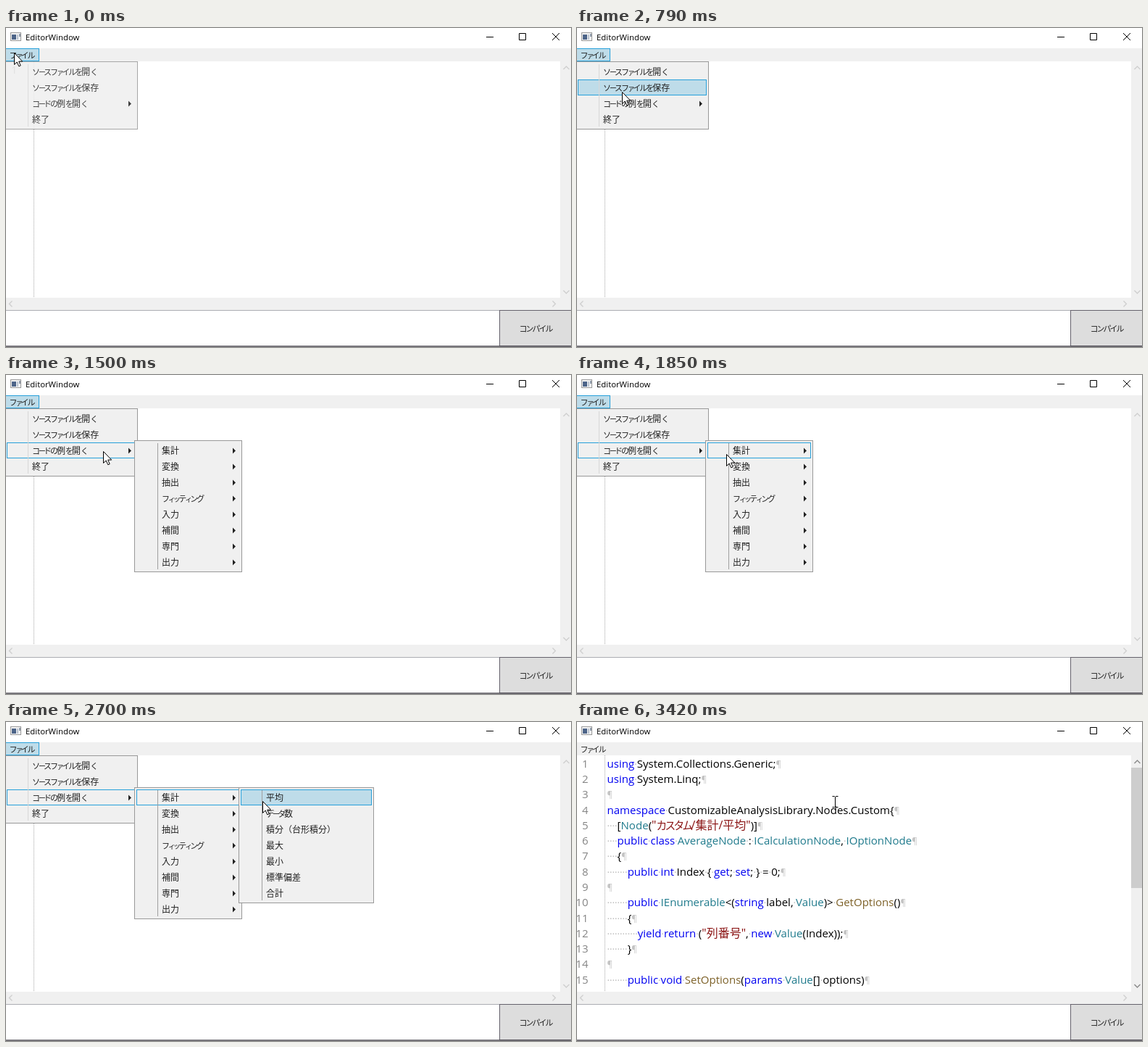
These frames come from a looping animation (780x440 px, 4.61 s). An HTML page:

```html
<!DOCTYPE html>
<html lang="ja">
<head>
<meta charset="utf-8">
<title>EditorWindow</title>
<style>
html, body { margin: 0; width: 100%; height: 100%; overflow: hidden; background: #fff; }
svg { display: block; }
text { font: 12px "Noto Sans CJK JP", "Noto Sans CJK", sans-serif; fill: #212121; }
.title { font: 11.35px "Open Sans", sans-serif; fill: #000; }
.code text { font: 15.05px "Open Sans", "Noto Sans CJK JP", "Noto Sans CJK", sans-serif; fill: #000; }
.code .num { fill: #858585; text-anchor: end; }
/* narrow kana, and narrower small kana */
.k { font-size: .92em; letter-spacing: -.185em; }
.s { font-size: .82em; letter-spacing: -.28em; }
.dot { font-size: 13.2px; fill: #b4b4b4; }
.eol { font-size: 12px; fill: #c4c4c4; }
.key { fill: #0000f0; }
.type { fill: #1f7a8c; }
.str { fill: #8b1515; font-size: 16px; }
.call { fill: #7d6128; }
.line { fill: none; stroke: #000; }
.chev { fill: none; stroke: #cfcfcf; stroke-width: 1.4; }
.panel { fill: #f0f0f0; stroke: #999; }
.hot { fill: #bedce9; stroke: #26a0da; }
.head { fill: none; stroke: #26a0da; }
</style>
</head>
<body>
<svg id="stage" width="780" height="440" viewBox="0 0 780 440"></svg>
<script>
const LOOP = 4610, TICK = 71.2;
const stage = document.getElementById('stage');

const span = (cls, s) => `<tspan class="${cls}">${s}</tspan>`;
const rect = (x, y, w, h, attrs) => `<rect x="${x}" y="${y}" width="${w}" height="${h}" ${attrs}/>`;
const path = (d, attrs) => `<path d="${d}" ${attrs}/>`;

const plain = s => s.replace(/[< ぁ-ヶー]/g, c =>
  c === '<' ? '&lt;' :
  c === ' ' ? span('dot', '·') :
  span('ァィッー'.includes(c) ? 's' : 'k', c));
const label = (x, y, s) => `<text x="${x}" y="${y}">${plain(s)}</text>`;

// Code view
const source = `using System.Collections.Generic;
using System.Linq;

namespace CustomizableAnalysisLibrary.Nodes.Custom{
    [Node("カスタム/集計/平均")]
    public class AverageNode : ICalculationNode, IOptionNode
    {
        public int Index { get; set; } = 0;

        public IEnumerable<(string label, Value)> GetOptions()
        {
            yield return ("列番号", new Value(Index));
        }

        public void SetOptions(params Value[] options)
        {`.split('\n');

const rules = [
  ['str', /^"[^"]*"$/],
  ['key', /^(using|namespace|public|class|int|get|set|string|yield|return|new|void|params)$/],
  ['type', /^(Node|AverageNode|ICalculationNode|IOptionNode|IEnumerable|Value)$/],
  ['call', /^[GS]etOptions$/]
];
const paint = line => line.split(/("[^"]*"|\w+)/).map(word => {
  const rule = rules.find(r => r[1].test(word));
  return rule ? span(rule[0], plain(word)) : plain(word);
}).join('') + span('eol', '¶');

const lineY = i => 62.7 + 21.28 * i;
const lineNo = i => `<text class="num" x="15.5" y="${lineY(i)}">${i + 1}</text>`;
const codeView = source.map((s, i) =>
  (i ? lineNo(i) : '') + `<text x="41.5" y="${lineY(i)}">${paint(s)}</text>`).join('');

// Menus
const menus = [
  { x: -1, y: 46, w: 182, bar: 30, open: -1.6, hotX: 1.5, hotW: 177, tone: '#d7d7d7',
    items: ['ソースファイルを開く', 'ソースファイルを保存', 'コードの例を開く>', '終了'] },
  { x: 177, y: 90, w: 148, bar: 209, open: 18, hotX: 180.5, hotW: 142, tone: '#a0a0a0',
    items: ['集計>', '変換>', '抽出>', 'フィッティング>', '入力>', '補間>', '専門>', '出力>'] },
  { x: 321, y: 90, w: 186, bar: 353, open: 31, hotX: 324.5, hotW: 180, tone: '#a0a0a0',
    items: ['平均', 'データ数', '積分（台形積分）', '最大', '最小', '標準偏差', '合計'] }
];
const menuView = (m, id) => {
  const h = m.items.length * 22 + 5;
  const rows = m.items.map((s, i) => {
    const mid = m.y + 14.5 + 22 * i, ax = m.x + m.w - 12;
    return label(m.bar + 6, mid + 4.5, s.replace('>', '')) +
      (s.endsWith('>') ? path(`M${ax} ${mid - 4}l4 4l-4 4z`, 'fill="#212121"') : '');
  }).join('');
  return `<g id="menu${id}">` + rect(m.x + .5, m.y + .5, m.w, h, 'class="panel"') +
    rect(m.hotX, m.y + 3.5, m.hotW, 21, `id="hot${id}"`) +
    path(`M${m.bar + .5} ${m.y + 4}v${h - 7}`, `stroke="${m.tone}"`) + rows + '</g>';
};

stage.innerHTML =
  '<clipPath id="edit">' + rect(0, 46, 765, 326, '') + '</clipPath>' +
  rect(0, 0, 780, 440, 'fill="#fff"') +
  rect(6.5, 6.5, 14, 11, 'fill="#f4f4f4" stroke="#9a9a9a"') +
  rect(8, 9, 6, 7, 'fill="#4c6488"') + rect(15, 9, 2, 7, 'fill="#b9c3d0"') + rect(18, 8, 2, 4, 'fill="#8d99a8"') +
  '<text class="title" x="27" y="17">EditorWindow</text>' +
  path('M663 12.5h10M708.5 7.5h9v9h-9zM754 7l10 10M764 7l-10 10', 'class="line"') +
  rect(0, 28, 780, 18, 'fill="#f0f0f0"') +
  rect(-.5, 28.5, 46, 17, 'id="file" class="hot"') +
  label(4.5, 42, 'ファイル') +
  rect(765, 46, 15, 326, 'fill="#f0f0f0"') + rect(0, 372, 780, 17, 'fill="#f0f0f0"') +
  path('M38.5 46V372', 'stroke="#a8a8a8" stroke-dasharray="1 1"') +
  path('M8.5 376.5l-4 4l4 4M754.5 376.5l4 4l-4 4', 'class="chev"') +
  path('M769.5 57l4-4l4 4M769.5 362l4 4l4-4', 'id="arrows" class="chev"') +
  '<g class="code" clip-path="url(#edit)">' + lineNo(0) + '<g id="code">' + codeView + '</g></g>' +
  rect(765, 63, 15, 166, 'id="thumb" fill="#cdcdcd"') +
  path('M0 389.5H682', 'stroke="#abadb3"') +
  rect(681.5, 389.5, 99, 49, 'fill="#ddd" stroke="#66626c"') +
  path('M0 439H780', 'stroke="#4b4850" stroke-width="1.6"') +
  label(708.5, 418.5, 'コンパイル') +
  menus.map(menuView).join('') +
  '<circle id="press" cx="353" cy="109" r="11.5" fill="#f5bd41" fill-opacity=".68"/>' +
  path('M.5 .5V16.5L4.2 13L6.8 18.8L9.2 17.8L6.7 12.1H11.7Z', 'id="arrow" fill="#fff" stroke="#000"') +
  path('M352.5 102.5h3l1 1l1-1h3M356.5 103v14M352.5 117.5h3l1-1l1 1h3', 'id="beam" class="line"');

const el = {};
for (const node of stage.querySelectorAll('[id]')) el[node.id] = node;

// Pointer route: tick, x, y
const route = [
  [0, 11, 34], [2, 11, 34], [8, 47, 71], [10, 57, 84], [13, 71, 97], [14, 71, 97],
  [17, 76, 99], [22, 149, 106], [26, 206, 109], [30, 206, 109], [34, 234, 109], [38, 354, 109]
];
const pointer = n => {
  const i = route.findIndex(p => p[0] >= n);
  if (i < 0) return route[route.length - 1].slice(1);
  if (!i) return route[0].slice(1);
  const [a, b] = [route[i - 1], route[i]];
  const f = (n - a[0]) / (b[0] - a[0]);
  return [a[1] + (b[1] - a[1]) * f, a[2] + (b[2] - a[2]) * f];
};

const show = (id, on) => el[id].setAttribute('visibility', on ? 'visible' : 'hidden');

function draw(now) {
  const n = Math.floor((now % LOOP + 5) / TICK);
  const [x, y] = pointer(n);
  const closed = n >= 47, loaded = n >= 48;

  menus.forEach((m, i) => {
    const alpha = closed ? 0 : Math.max(0, Math.min(1, (n - m.open + 1) / 3));
    el['menu' + i].setAttribute('opacity', alpha);
    const row = i ? 0 : Math.ceil((y - 49) / 22) - 1;
    const over = row >= 0 && x >= (i ? m.hotX : 0);
    const hot = el['hot' + i];
    hot.setAttribute('y', m.y + 3.5 + 22 * Math.max(0, row));
    hot.setAttribute('class', over && m.items[row].endsWith('>') ? 'head' : 'hot');
    hot.setAttribute('opacity', over ? 1 : 0);
  });

  el.arrow.setAttribute('transform', `translate(${Math.round(x)} ${Math.round(y)})`);
  el.arrows.style.stroke = loaded ? '#8a8a8a' : '';
  show('file', !closed);
  show('press', n === 45 || n === 46);
  show('arrow', !loaded);
  show('beam', loaded);
  show('code', loaded);
  show('thumb', loaded);
}

function loop() {
  draw(performance.now());
  requestAnimationFrame(loop);
}
loop();
</script>
</body>
</html>
```
